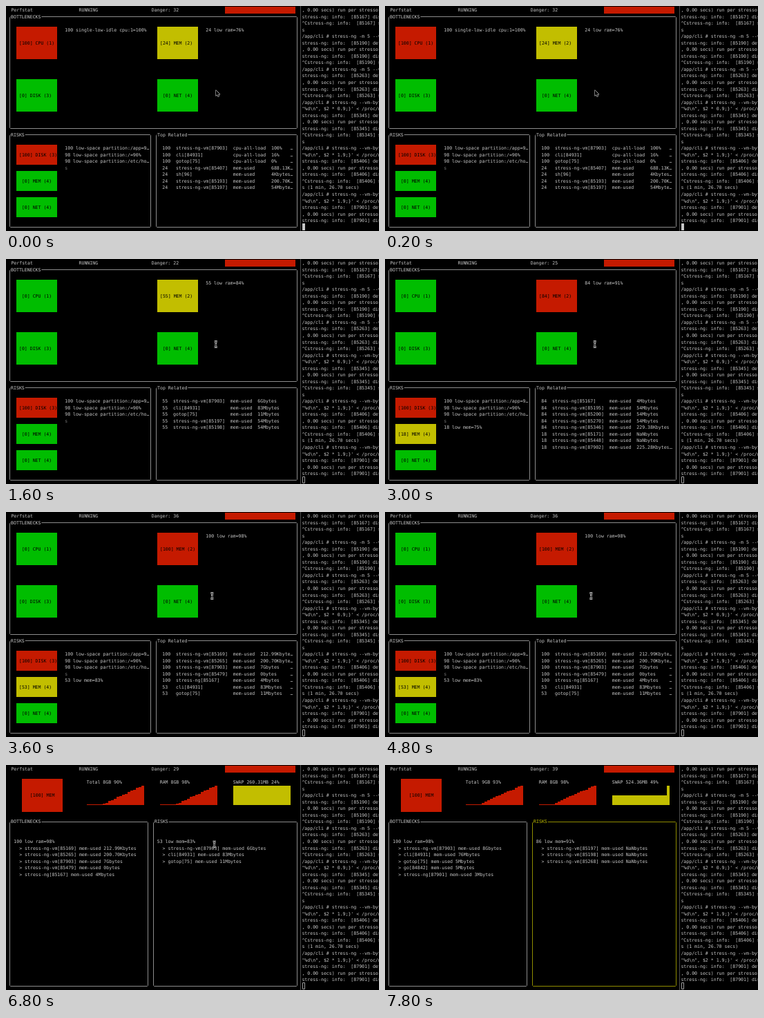
Write an HTML page with a canvas that moves like this. It is 540 by 326 pixels and loops after 8000 ms.

```html
<!DOCTYPE html>
<html lang="en">
<head>
<meta charset="utf-8">
<title>Terminal monitor</title>
<style>
  html, body { margin: 0; width: 100%; height: 100%; overflow: hidden; background: #000; }
  canvas { display: block; width: 540px; height: 326px; }
</style>
</head>
<body>
<canvas id="stage"></canvas>
<script>
const LOOP = 8000, WIDTH = 540, HEIGHT = 326;
const COL = 3.95, ROW = 9.53;
const RED = '#c51a00', GREEN = '#00bd00', YELLOW = '#c2be00', TEXT = '#c7c7c7';
const LINE = '#8c8c8c', LINE_SELECTED = '#8f8c00';

const canvas = document.getElementById('stage');
const ctx = canvas.getContext('2d');
const dpr = window.devicePixelRatio || 1;
canvas.width = WIDTH * dpr;
canvas.height = HEIGHT * dpr;

const rowTop = row => 1 + row * ROW;
const rowMid = row => rowTop(row) + ROW / 2;

// Edges snap to whole pixels so that neighbouring blocks join without seams.
function rect(left, top, right, bottom, color) {
  const [x, y, x2, y2] = [left, top, right, bottom].map(Math.round);
  ctx.fillStyle = color;
  ctx.fillRect(x, y, x2 - x, y2 - y);
}

function text(str, x, row, color = TEXT) {
  ctx.fillStyle = color;
  ctx.fillText(str, x, rowMid(row) + 2.4);
}

function lines(list, x, row) {
  list.forEach((str, i) => text(str, x, row + i));
}

// Bordered panel whose title replaces the start of the top line.
function panel(title, left, right, firstRow, lastRow, selected = false) {
  const top = Math.floor(rowMid(firstRow)) + 0.5;
  const bottom = Math.floor(rowMid(lastRow)) + 0.5;
  ctx.strokeStyle = selected ? LINE_SELECTED : LINE;
  ctx.lineWidth = 1;
  ctx.beginPath();
  ctx.moveTo(left + 2.5 + title.length * COL, top);
  ctx.lineTo(right - 1, top);
  ctx.lineTo(right, top + 1);
  ctx.lineTo(right, bottom - 1);
  ctx.lineTo(right - 1, bottom);
  ctx.lineTo(left + 1, bottom);
  ctx.lineTo(left, bottom - 1);
  ctx.lineTo(left, top + 1);
  ctx.lineTo(left + 1, top);
  ctx.stroke();
  text(title, left + 1.6, firstRow, selected ? YELLOW : TEXT);
}

// Status tile, 15 columns wide, with a roughly centred label.
function tile(score, label, x, row, rows) {
  const color = score >= 80 ? RED : score > 0 ? YELLOW : GREEN;
  const str = `[${score}] ${label}`;
  const indent = Math.max(1, Math.floor((15 - str.length) / 2));
  rect(x, rowTop(row), x + 15 * COL, rowTop(row + rows), color);
  text(str, x + indent * COL, row + (rows - 1) / 2, '#000');
}

function table(rows) {
  const cells = rows.map(r => r.split(' '));
  const widths = [0, 1, 2, 3].map(c => Math.max(...cells.map(r => r[c].length)));
  cells.forEach((r, i) => {
    let str = r.map((cell, c) => cell.padEnd(widths[c])).join('  ');
    if (str.length >= 48) str = str.slice(0, 47) + '…';
    text(str, 226.3, 21 + i);
  });
}

// ---- shell pane ----
const info = (pid, rest, prefix = '') => `${prefix}stress-ng: info:  [${pid}] ${rest}`;
const run = (command, pid, ...tail) => [
  ...command,
  info(pid, 'defaulting to a'),
  ', 0.00 secs) run per stressor',
  info(pid, 'dispatching'),
  info(pid, 'successful', '^C'),
  ...tail
];
const simple = ['/app/cli # stress-ng -m 5 --vm'];
const sized = factor => ['/app/cli # stress-ng --vm-bytes', `"%d\\n", $2 * ${factor};}' < /proc/meminfo`];
const shell = [
  ...run([], 85167, 's').slice(1),
  ...run(simple, 85190),
  ...run(simple, 85263),
  ...run(sized(0.9), 85345, 's'),
  ...run(sized(1.9), 85406, 's (1 min, 26.70 secs)'),
  ...run(sized(1.9), 87901).slice(0, -1)
];

function drawShell(focused) {
  rect(426, 0, 427, HEIGHT, '#4a4a4a');
  lines(shell, 428.4, 0);
  if (focused) {
    rect(429, 315, 433, 325, TEXT);
  } else {
    ctx.strokeStyle = '#a0a0a0';
    ctx.lineWidth = 1;
    ctx.strokeRect(429.5, 315.5, 3, 9);
  }
}

// ---- monitor views ----
function overview(s) {
  panel('BOTTLENECKS', 5.5, 421.5, 1, 18);
  panel('RISKS', 5.5, 209.5, 19, 33);
  panel('Top Related', 217.5, 421.5, 19, 33);
  tile(s.cpu, 'CPU (1)', 15, 3, 5);
  tile(s.mem, 'MEM (2)', 219, 3, 5);
  tile(0, 'DISK (3)', 15, 11, 5);
  tile(0, 'NET (4)', 219, 11, 5);
  if (s.cpu) text(`${s.cpu} single-low-idle cpu:1=100%`, 85.3, 3);
  text(`${s.mem} low ram=${s.ram}%`, 289.3, 3);

  tile(100, 'DISK (3)', 15, 21, 3);
  tile(s.memRisk, 'MEM (4)', 15, 25, 3);
  tile(0, 'NET (4)', 15, 29, 3);
  lines(['100 low-space partition:/app=9…', '98 low-space partition:/=90%',
    '98 low-space partition:/etc/ho…'], 85.3, 21);
  text('s', 85.3, 24, '#777');
  if (s.memRisk) text(`${s.memRisk} low mem=${s.used}%`, 85.3, 25);
  table(s.related);
  if (s.overflowRow) text('…', 226.3 + 47 * COL, s.overflowRow);
}

const BAR_COUNT = 21, CHART_ROWS = 3;

function chart(x, color, level) {
  const unit = ROW / 8, bottom = rowTop(6);
  for (let i = 0; i < BAR_COUNT; i++) {
    const steps = Math.max(1, Math.round(level(i / (BAR_COUNT - 1)) * CHART_ROWS * 8));
    rect(x + i * COL, bottom - steps * unit, x + (i + 1) * COL, bottom, color);
  }
}

function details(s) {
  const climb = k => (k - s.climbFrom) / (1 - s.climbFrom);
  tile(100, 'MEM', 23, 2, 5);
  text(s.total, 116.7, 2);
  text('RAM 8GB 98%', 222.7, 2);
  text(s.swap, 328.7, 2);
  chart(116.7, RED, climb);
  chart(222.7, RED, climb);
  chart(328.7, YELLOW, k => k === 1 ? 1 : s.swapBase);

  panel('BOTTLENECKS', 5.5, 205.5, 8, 33);
  panel('RISKS', 213.5, 421.5, 8, 33, s.selected);
  lines(['100 low ram=98%', ...s.bottlenecks.map(b => '  > ' + b)], 11.3, 11);
  lines([s.risk, ...s.risks.map(r => '  > ' + r)], 218.7, 11);
}

const vm = pid => `stress-ng-vm[${pid}]`;
const used = (score, name, size) => `${score} ${name} mem-used ${size}`;

const states = [
  { at: 0, view: overview, danger: 32, cpu: 100, mem: 24, ram: 76, memRisk: 0, related: [
    `100 ${vm(87903)} cpu-all-load 100%`, '100 cli[84931] cpu-all-load 16%', '100 gotop[75] cpu-all-load 0%',
    used(24, vm(85407), '688.13Kbytes'), used(24, 'sh[96]', '4Kbytes'),
    used(24, vm(85193), '200.70Kbytes'), used(24, vm(85197), '54Mbytes')] },
  { at: 600, view: overview, danger: 22, cpu: 0, mem: 55, ram: 84, memRisk: 0, related: [
    used(55, vm(87903), '6Gbytes'), used(55, 'cli[84931]', '83Mbytes'), used(55, 'gotop[75]', '11Mbytes'),
    used(55, vm(85197), '54Mbytes'), used(55, vm(85198), '54Mbytes')] },
  { at: 2800, view: overview, danger: 25, cpu: 0, mem: 84, ram: 91, memRisk: 18, used: 75, overflowRow: 28, related: [
    used(84, 'stress-ng[85167]', '4Mbytes'),
    ...[85195, 85200, 85270].map(pid => used(84, vm(pid), '54Mbytes')),
    used(84, vm(85346), '229.38Kbytes'), used(18, vm(85171), 'NaNbytes'),
    used(18, vm(85448), 'NaNbytes'), used(18, vm(87902), '225.28Kbytes')] },
  { at: 3400, view: overview, danger: 36, cpu: 0, mem: 100, ram: 98, memRisk: 53, used: 83, related: [
    used(100, vm(85169), '212.99Kbytes'), used(100, vm(85265), '200.70Kbytes'),
    used(100, vm(87903), '7Gbytes'), used(100, vm(85479), '0bytes'),
    used(100, 'stress-ng[85167]', '4Mbytes'), used(53, 'cli[84931]', '83Mbytes'),
    used(53, 'gotop[75]', '11Mbytes')] },
  { at: 6800, view: details, danger: 29, total: 'Total 8GB 90%', swap: 'SWAP 260.31MB 24%',
    climbFrom: 0.25, swapBase: 1, risk: '53 low mem=83%',
    bottlenecks: [`${vm(85169)} mem-used 212.99Kbytes`, `${vm(85265)} mem-used 200.70Kbytes`,
      `${vm(87903)} mem-used 7Gbytes`, `${vm(85479)} mem-used 0bytes`, 'stress-ng[85167] mem-used 4Mbytes'],
    risks: [`${vm(87903)} mem-used 6Gbytes`, 'cli[84931] mem-used 83Mbytes', 'gotop[75] mem-used 11Mbytes'] },
  { at: 7000, view: details, danger: 39, total: 'Total 9GB 93%', swap: 'SWAP 524.36MB 49%',
    climbFrom: 0.2, swapBase: 0.5, risk: '86 low mem=91%', selected: true,
    bottlenecks: [`${vm(87903)} mem-used 8Gbytes`, 'cli[84931] mem-used 76Mbytes',
      'gotop[75] mem-used 5Mbytes', 'go[84842] mem-used 5Mbytes', 'stress-ng[87901] mem-used 3Mbytes'],
    risks: [85197, 85198, 85268].map(pid => `${vm(pid)} mem-used NaNbytes`) }
];

// ---- mouse pointer ----
const pointer = [
  { at: 0, x: 304, y: 122, draw: arrow },
  { at: 400, x: 303.8, y: 123.5, draw: beam },
  { at: 3400, x: 298.3, y: 121.5, draw: beam },
  { at: 5400, x: 301.6, y: 115, draw: beam },
  { at: 7000, draw() {} }
];

function outline(path, width) {
  ctx.lineJoin = 'round';
  ctx.strokeStyle = '#ddd';
  ctx.lineWidth = width;
  ctx.stroke(path);
}

function arrow(x, y) {
  const path = new Path2D(`M${x} ${y} v8 l1.8 -1.7 l1.3 2.9 l1.2 -.6 l-1.3 -2.7 h2.4 z`);
  outline(path, 1.1);
  ctx.fillStyle = '#000';
  ctx.fill(path);
}

function beam(x, y) {
  const path = new Path2D(`M${x - 2} ${y - 4.3} q2 0 2 2 q0 -2 2 -2 M${x} ${y - 2.3} v4.6
    M${x - 2} ${y + 4.3} q2 0 2 -2 q0 2 2 2 M${x - 1.2} ${y + 1} h2.4`);
  outline(path, 2.6);
  ctx.strokeStyle = '#111';
  ctx.lineWidth = 0.9;
  ctx.stroke(path);
}

const current = (list, time) => list.filter(item => item.at <= time).pop();

function draw(now) {
  const time = now % LOOP;
  const state = current(states, time);
  const mouse = current(pointer, time);

  ctx.setTransform(dpr, 0, 0, dpr, 0, 0);
  ctx.font = '6.56px "DejaVu Sans Mono", monospace';
  rect(0, 0, WIDTH, HEIGHT, '#000');

  text('Perfstat', 7.4, 0);
  text('RUNNING', 105.5, 0);
  text(`Danger: ${state.danger}`, 210.7, 0);
  rect(317, rowTop(0), 419, rowTop(1), RED);
  state.view(state);

  drawShell(time < 400);
  mouse.draw(mouse.x, mouse.y);
}

const start = performance.now();
function tick() {
  draw(performance.now() - start);
  requestAnimationFrame(tick);
}
tick();
</script>
</body>
</html>
```
